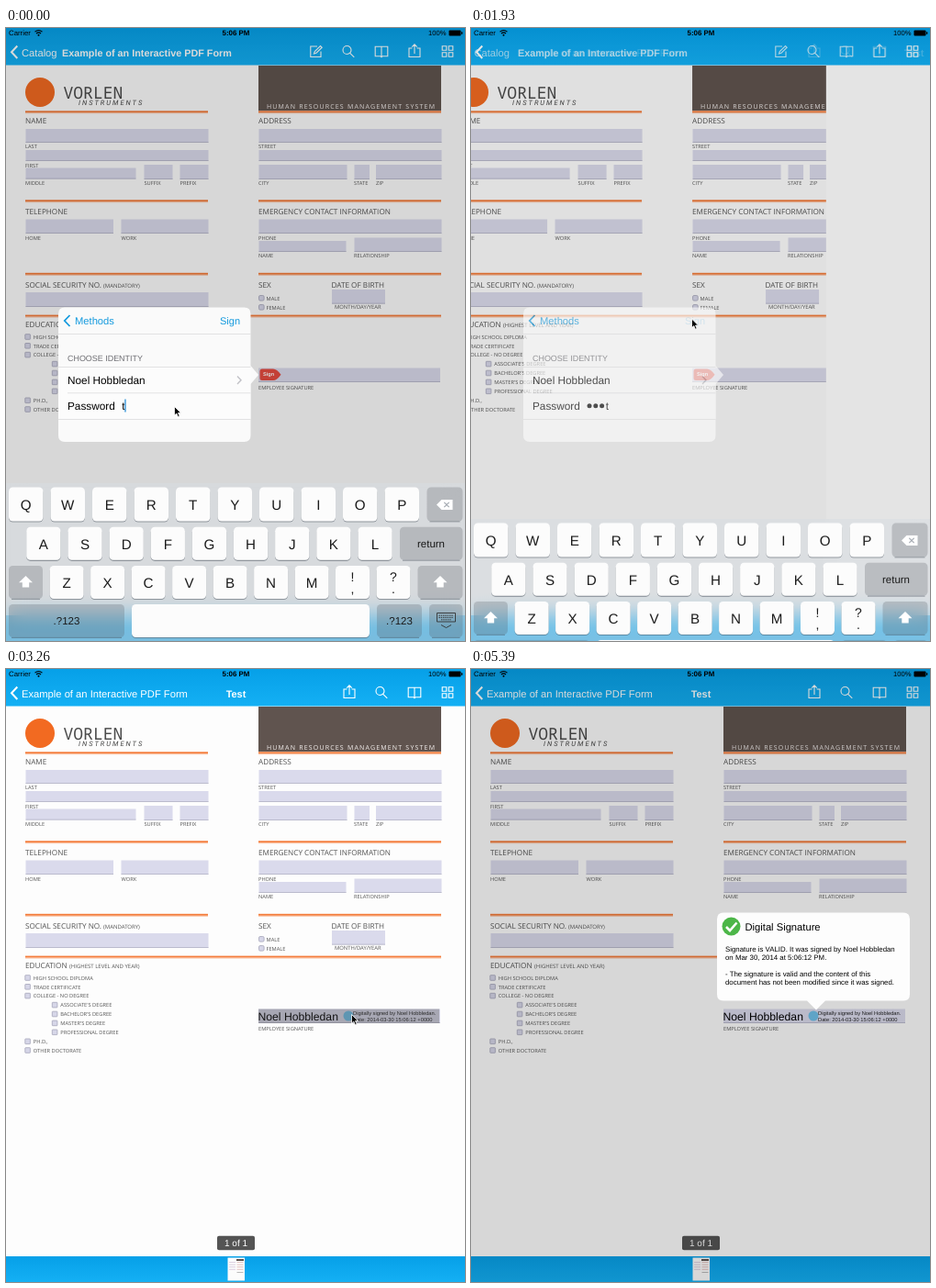
These frames come from a looping animation (500 px wide and 668 px high, 5.96 s). An HTML page:

```html
<!DOCTYPE html>
<html lang="en">
<head>
<meta charset="utf-8">
<title>Signing a form</title>
<style>
  html, body { margin: 0; width: 100%; height: 100%; overflow: hidden; background: #fff; }
  #stage { position: relative; width: 500px; height: 668px; overflow: hidden; }
  svg { position: absolute; left: 0; top: 0; display: block; overflow: hidden; }
  text { font-family: "Liberation Sans", Arial, sans-serif; white-space: pre; text-rendering: geometricPrecision; }
  .form text { font-family: "Open Sans", "Noto Sans", sans-serif; fill: #545454; }
  .form .logo { font-family: "Noto Sans Mono", monospace; font-weight: 300; fill: #4a4a4a; }
  .form .sub { font-family: Roboto, sans-serif; font-style: italic; fill: #444; letter-spacing: 2px; }
  .form .head { fill: #f4f0ee; letter-spacing: 1.18px; }
  .mid { text-anchor: middle; }
  .bold { font-weight: bold; }
  .line { fill: none; stroke: #fff; stroke-width: 1.1; }
  .blue { fill: #149ade; }
  #keyboard {
    position: absolute; left: 0; top: 496px; width: 500px; height: 172px;
    background: rgba(215, 220, 226, .55);
    -webkit-backdrop-filter: blur(11px) saturate(1.3); backdrop-filter: blur(11px) saturate(1.3);
  }
  #keyboard text { fill: #1a1a1a; }
</style>
</head>
<body>
<div id="stage">
  <svg id="scene" width="500" height="668"></svg>
  <div id="keyboard"></div>
  <svg id="top" width="500" height="668"></svg>
</div>
<script>
const signer = 'Noel Hobbledan';
const $ = id => document.getElementById(id);

const text = (x, y, str, size, cls = '', extra = '') =>
  `<text x="${x}" y="${y}" font-size="${size}" class="${cls}" ${extra}>${str}</text>`;
const rect = (x, y, w, h, fill, rx = 0) =>
  `<rect x="${x}" y="${y}" width="${w}" height="${h}" rx="${rx}" fill="${fill}"/>`;
const path = (d, attrs) => `<path d="${d}" ${attrs}/>`;
const group = (id, body, attrs = '') => `<g id="${id}" ${attrs}>${body}</g>`;

function formPage() {
  const field = (x, y, w, h) => rect(x, y, w, h, '#dadaec') + rect(x, y + h - .8, w, .8, '#b4b4c6');
  const rule = (x, y, w) => rect(x, y, w, 2, '#f47d3c') + rect(x, y + 2, w, .9, '#f9bd9b');
  const head = (x, y, str) => text(x, y, str, 8.2);
  const label = (x, y, str) => text(x, y, str, 5.7);
  const box = (x, y, r) =>
    `<rect x="${x}" y="${y}" width="5.6" height="5.6" rx="${r}" fill="#d6d6e8" stroke="#a6a6ba" stroke-width=".8"/>`;
  const check = (x, y, str) => box(x - 9, y - 5, .5) + label(x, y, str);

  return rect(0, 40, 500, 628, '#fdfdfd') +
    '<circle cx="37" cy="70" r="16" fill="#f26a21"/>' +
    text(62.5, 76.5, 'VORLEN', 18, 'logo') + text(79, 84.4, 'INSTRUMENTS', 7.5, 'sub') +
    rect(275, 41, 199, 49, '#60544f') +
    text(284, 87.5, 'HUMAN RESOURCES MANAGEMENT SYSTEM', 7, 'head') +
    [90.3, 187.3, 266.8].map(y => rule(21, y, 199) + rule(275, y, 199)).join('') +
    rule(21, 312.6, 453) +

    head(21, 104, 'NAME') + field(21.5, 110, 199, 15) + label(21, 131, 'LAST') +
    field(21.5, 133, 199, 12) + label(21, 151.5, 'FIRST') +
    field(21.5, 152.5, 120, 12) + label(21, 171, 'MIDDLE') +
    field(150.5, 149, 31, 16) + label(150.5, 171, 'SUFFIX') +
    field(189.5, 149, 31, 16) + label(189.5, 171, 'PREFIX') +
    head(21, 203, 'TELEPHONE') + field(21.5, 208.5, 95.5, 15.5) + label(21, 231, 'HOME') +
    field(125.5, 208.5, 95, 15.5) + label(125.5, 231, 'WORK') +
    head(21, 283, 'SOCIAL SECURITY NO.') + text(106, 283, '(MANDATORY)', 6) +
    field(21.5, 288, 199, 16) +

    head(275, 104, 'ADDRESS') + field(275.5, 110, 199, 15) + label(275, 131, 'STREET') +
    field(275.5, 133, 199, 12) + field(275.5, 149, 96, 16) + label(275, 171, 'CITY') +
    field(379.5, 149, 16.5, 16) + label(379, 171, 'STATE') +
    field(403, 149, 71.5, 16) + label(403, 171, 'ZIP') +
    head(275, 203, 'EMERGENCY CONTACT INFORMATION') + field(275.5, 208.5, 199, 15.5) +
    label(275, 230.5, 'PHONE') + field(275.5, 232, 95, 12) + label(275, 250, 'NAME') +
    field(379.5, 228.5, 95, 15.5) + label(379, 250, 'RELATIONSHIP') +
    head(275, 283, 'SEX') + box(275.5, 291.5, 1.4) + label(283.5, 296.5, 'MALE') +
    box(275.5, 301.5, 1.4) + label(283.5, 306.5, 'FEMALE') +
    head(354.5, 283, 'DATE OF BIRTH') + field(355, 285, 58, 15.5) + text(358, 306, 'MONTH/DAY/YEAR', 5.85) +

    head(21, 326, 'EDUCATION') + text(69, 326, '(HIGHEST LEVEL AND YEAR)', 6) +
    ['HIGH SCHOOL DIPLOMA', 'TRADE CERTIFICATE', 'COLLEGE - NO DEGREE']
      .map((s, i) => check(29.8, 338.7 + i * 9.8, s)).join('') +
    ["ASSOCIATE'S DEGREE", "BACHELOR'S DEGREE", "MASTER'S DEGREE", 'PROFESSIONAL DEGREE']
      .map((s, i) => check(59.3, 368.3 + i * 9.9, s)).join('') +
    check(29.8, 408, 'PH.D.,') + check(29.8, 417.7, 'OTHER DOCTORATE') +
    field(275, 370.5, 198, 15.5) + label(275, 394, 'EMPLOYEE SIGNATURE');
}

function signature() {
  return '<circle cx="373" cy="378" r="5.5" fill="#6fc0ea"/>' +
    text(274.5, 383, signer, 12.2) +
    text(378, 376.6, `Digitally signed by ${signer}.`, 5.72, '', 'fill="#222"') +
    text(378, 384, 'Date: 2014-03-30 15:06:12 +0000', 5.75, '', 'fill="#222"') +
    group('press', rect(275, 370.5, 197, 15.5, 'rgba(60,60,60,.32)'));
}

function icons(names, xs) {
  const shapes = {
    edit: 'M1-5.5H-6.2V6H5V0M-2.5 2.5L-1.7 0 4.5-6 6.2-4.3 0 1.7Z',
    search: 'M3-1.5A4.5 4.5 0 1 1-6-1.5 4.5 4.5 0 1 1 3-1.5M1.7 1.8L6.3 6.3',
    book: 'M-6.8-5.3H6.8V5.3H1L0 6.3-1 5.3H-6.8ZM0-5.3V6',
    share: 'M-2.5-3.5H-6V6H6V-3.5H2.5M0 2.5V-7.5M-2.8-4.8L0-7.6 2.8-4.8',
    grid: 'M-5.8-5.8h4.6v4.6h-4.6zM1.2-5.8h4.6v4.6h-4.6zM-5.8 1.2h4.6v4.6h-4.6zM1.2 1.2h4.6v4.6h-4.6z'
  };
  return names.map((n, i) => path(shapes[n], `class="line" transform="translate(${xs[i]} 25.5)"`)).join('');
}

function bars() {
  const status =
    text(3, 8.3, 'Carrier', 7.8) + text(250.5, 8.3, '5:06 PM', 7.9, 'mid bold') + text(460, 8.3, '100%', 7.6) +
    path('M31.5 4.2Q35.5.8 39.5 4.2M33 6Q35.5 3.8 38 6', 'fill="none" stroke="#000" stroke-width="1.1"') +
    '<circle cx="35.5" cy="7.7" r="1"/>' + rect(482.5, 2.6, 13, 5.8, '#000', 1) + rect(496, 4.3, 1.3, 2.4, '#000');
  const title = 'Example of an Interactive PDF Form';
  return rect(0, 0, 500, 40.5, 'url(#bar)') + status +
    path('M12.3 19.5L6 26.2 12.3 33', 'class="line" style="stroke-width:2"') +
    `<g fill="#fff">` +
    group('oldBack', text(17, 30.5, 'Catalog', 11.2)) +
    group('oldTitle', text(61, 30.5, title, 10.8, 'bold')) +
    group('newBack', text(17, 30.5, title, 11.2)) +
    group('newTitle', text(250.5, 30.5, 'Test', 10.9, 'bold mid')) + '</g>' +
    group('oldIcons', icons(['edit', 'search', 'book', 'share'], [338, 373, 409, 445])) +
    group('newIcons', icons(['share', 'search', 'book'], [374, 409, 445])) + icons(['grid'], [481]);
}

function thumbnail() {
  let out = rect(241.5, 641.5, 18.5, 25, '#fcfcfc') + rect(251, 643, 8, 2, '#5d514d');
  for (let y = 646; y < 655; y += 2.6)
    out += rect(243, y, 7, 1, '#dccfe0') + rect(251.5, y, 7, 1, '#e5c4c0');
  return out + rect(251.5, 657, 7, .8, '#aaa');
}

function keyboard() {
  const shade = 'rgba(80,86,93,.25)', ink = 'stroke="#333" fill="none"';
  const key = (x, y, w, h, fill = '#fcfcfc') =>
    rect(x, y + 1.1, w, h, 'rgba(70,80,90,.5)', 4.5) + rect(x, y, w, h, fill, 4.5);
  // tinted keys get only a thin shadow below, since their face is translucent
  const dark = (x, y, w, h) => rect(x, y, w, h, shade, 4.5) +
    path(`M${x + 3} ${y + h + .4}h${w - 6}`, 'stroke="rgba(70,80,90,.5)"');
  const row = (chars, x, y, pitch, w, h) => [...chars].map((c, i) =>
    key(x + i * pitch, y, w, h) + text(x + i * pitch + w / 2, y + h / 2 + 5.7, c, 15.2, 'mid')).join('');
  const pair = (x, a, b) => key(x, 586, 37, 36) +
    text(x + 18.5, 603, a, 14, 'mid') + text(x + 18.5, 616, b, 14, 'mid');
  const shift = x => path(`M${x} 597l7.5 7.2h-3.8v5.3h-7.4v-5.3h-3.8z`, 'fill="#fff"');

  return `<svg width="500" height="172" viewBox="0 496 500 172">` +
    row('QWERTYUIOP', 3, 500.5, 45.5, 37.5, 37) + dark(458.5, 500.5, 39, 37) +
    path('M469 519.5l5.5-5.5h12v11h-12z', 'fill="#fff"') +
    path('M477.3 516.8l5.4 5.4m0-5.4l-5.4 5.4', 'stroke="#a5abb2" stroke-width="1.2"') +
    row('ASDFGHJKL', 22.2, 543.8, 45.15, 37.3, 36) + dark(429, 543.8, 68.5, 36) +
    text(463, 566, 'return', 11.5, 'mid') +
    dark(3, 586, 37, 36) + shift(21.5) + row('ZXCVBNM', 47.6, 586, 44.5, 37, 36) +
    pair(359, '!', ',') + pair(403.5, '?', '.') + dark(448.5, 586, 49, 36) + shift(473) +
    dark(3, 628, 126, 36) + text(66, 650, '.?123', 11.5, 'mid') + key(137, 628, 259, 36) +
    dark(404, 628, 49, 36) + text(428.5, 650, '.?123', 11.5, 'mid') + dark(461, 628, 36.5, 36) +
    path('M469.5 637.5h20v9.5h-20zM474 650.5l5.5 3 5.5-3', `${ink} stroke-width=".9"`) +
    path('M471.5 640.2h16M471.5 642.4h16M474 644.8h11', `${ink} stroke-width="1" stroke-dasharray="1.4 .9"`) +
    '</svg>';
}

function signPopover() {
  const rowLine = (x, y) => rect(x, y, 266.5 - x, .7, '#d8d8da');
  return path('M64 304.5H259.5Q266.5 304.5 266.5 311.5V368L275 378 266.5 388V444Q266.5 451 259.5 451H64Q57 451 57 444V311.5Q57 304.5 64 304.5Z', 'fill="#fafafa"') +
    rect(57, 369.5, 209.5, 57, '#fcfcfc') +
    rowLine(57, 333) + rowLine(57, 369) + rowLine(67, 397.5) + rowLine(57, 426) +
    path('M69.5 313L63.8 319 69.5 325', 'fill="none" stroke="#149ade" stroke-width="1.8"') +
    text(75, 323, 'Methods', 11.2, 'blue') + group('sign', text(233, 323, 'Sign', 11, 'blue')) +
    text(67, 362.5, 'CHOOSE IDENTITY', 8.95, '', 'fill="#6d6d72"') +
    text(67, 387.7, signer, 11.8) + text(67, 416, 'Password', 11.8) +
    path('M252 379.5L256 383.7 252 388', 'fill="none" stroke="#c2c2c7" stroke-width="1.4"') +
    group('password', '');
}

function validPopover() {
  const lines = [[308, `Signature is VALID. It was signed by ${signer}`], [317, 'on Mar 30, 2014 at 5:06:12 PM.'],
    [334.5, '- The signature is valid and the content of this'], [344.2, 'document has not been modified since it was signed.']];
  return path('M275 265.5H471Q478 265.5 478 272.5V354.5Q478 361.5 471 361.5H386L376 371.5 366 361.5H275Q268 361.5 268 354.5V272.5Q268 265.5 275 265.5Z', 'fill="#fdfdfd"') +
    '<circle cx="283.5" cy="280.5" r="10" fill="#4cb648"/>' +
    path('M278 281L282 285 289.5 276.5', 'fill="none" stroke="#fff" stroke-width="2.6"') +
    text(298.5, 285, 'Digital Signature', 11.2) +
    lines.map(([y, s]) => text(277, y, s, 7.85)).join('');
}

$('scene').innerHTML =
  `<defs><linearGradient id="bar" x2="0" y2="1"><stop stop-color="#06a0e8"/><stop offset="1" stop-color="#14b0f4"/></linearGradient></defs>` +
  group('oldPage', group('form', formPage(), 'class="form"') +
    path('M279 371.5H291Q295 371.5 299.5 377.7 295 384 291 384H279Q276.5 384 276.5 381.5V374Q276.5 371.5 279 371.5Z', 'fill="#e54b3f"') +
    text(280, 379.2, 'Sign', 5.6, 'bold', 'fill="#fff"')) +
  group('pushDim', rect(0, 40, 500, 628, '#000')) +
  group('newPage', rect(0, 40, 500, 628, '#fdfdfd') +
    group('content', '<use href="#form"/>' + signature()) +
    rect(230, 617.8, 41, 15.5, '#545454', 2) + text(250.5, 629.3, '1 of 1', 10, 'mid', 'fill="#fff"')) +
  rect(0, 640, 500, 28, 'url(#bar)') + group('thumb', thumbnail()) + bars() +
  group('dim', rect(0, 0, 500, 668, '#000'));
$('keyboard').innerHTML = keyboard();
$('top').innerHTML = group('signPopover', signPopover()) + group('validPopover', validPopover()) +
  group('pointer', path('M0 0V9.6L2.3 7.6 3.9 11.2 5.6 10.4 4 7H7Z', 'stroke="#fff" stroke-width=".8"'));

const loop = 5960;
const ticks = [0, 300, 600, 750, 900, 1050, 1200, 1340, 1490, 1640, 1780, 1930, 2080, 2230, 2370,
  2520, 2670, 2820, 2970, 3110, 3260, 3410, 4790, 4940, 5090, 5240, 5390];
const moves = [
  { from: 1000, to: 1640, a: [183.5, 412.5], b: [240.5, 317] },
  { from: 2400, to: 3110, a: [240.5, 317], b: [376.5, 376.5] },
  { from: 4660, to: 5240, a: [376.5, 376.5], b: [457, 651] }
];
const clamp = v => Math.min(1, Math.max(0, v));
const smooth = v => v * v * (3 - 2 * v);
const fade = (id, v) => $(id).setAttribute('opacity', v);
const shift = (id, x, y = 0) => $(id).setAttribute('transform', `translate(${x} ${y})`);

function spring(ms) {
  const s = Math.max(0, ms) * .0183;
  const p = 1 - Math.exp(-s) * (1 + s);
  return p > .995 ? 1 : p;
}

function drawPassword(t) {
  const typed = [300, 600, 900].filter(at => t >= at).length;
  const pitch = 6.8, x = 126.3 + typed * pitch;
  let out = '';
  for (let i = 0; i < typed; i++)
    out += `<circle cx="${129 + i * pitch}" cy="411.8" r="2.5"/>`;
  out += text(x, 416, 'test'[typed], 11.8);
  if (t < 1780) out += rect(x + (typed % 3 ? 6 : 3), 404.5, 1.3, 14, '#2a8fd8');
  $('password').innerHTML = out;
}

function draw(t) {
  const p = spring(t - 1881), rest = 1 - p;
  const closing = clamp((t - 1860) / 200);
  const valid = t >= 3410 ? 1 : 0;

  shift('oldPage', -150 * p);
  fade('pushDim', p * .09);
  shift('newPage', 500 * rest);
  fade('newPage', p > 0 ? 1 : 0);
  fade('content', t >= 2370 ? 1 : 0);
  fade('press', t >= 3260 && t < 3410 ? 1 : 0);
  shift('thumb', 500 * rest);

  shift('oldBack', -60 * p);
  fade('oldBack', clamp(1 - p * 1.5));
  shift('oldTitle', -44 * p);
  fade('oldTitle', clamp(1 - p * 1.3));
  shift('newBack', 44 * rest);
  fade('newBack', p);
  shift('newTitle', 300 * rest);
  fade('newTitle', p);
  fade('oldIcons', rest);
  fade('newIcons', p);

  fade('dim', .15 * Math.max(1 - closing, valid));
  fade('signPopover', 1 - closing);
  fade('sign', t >= 1780 ? .2 : 1);
  fade('validPopover', valid);
  $('keyboard').style.transform = `translateY(${172 * p}px)`;
  $('keyboard').style.visibility = p < 1 ? 'visible' : 'hidden';
  drawPassword(t);

  const move = moves.filter(m => t >= m.from).pop() || moves[0];
  const k = smooth(clamp((t - move.from) / (move.to - move.from)));
  shift('pointer', ...move.a.map((v, i) => v + (move.b[i] - v) * k));
  fade('pointer', t < 5390 ? 1 : 0);
}

const start = performance.now();
let shown = -1;
function frame() {
  const t = (performance.now() - start) % loop;
  const tick = ticks.filter(v => v <= t).pop();
  if (tick !== shown) draw(shown = tick);
  requestAnimationFrame(frame);
}
frame();
</script>
</body>
</html>
```
